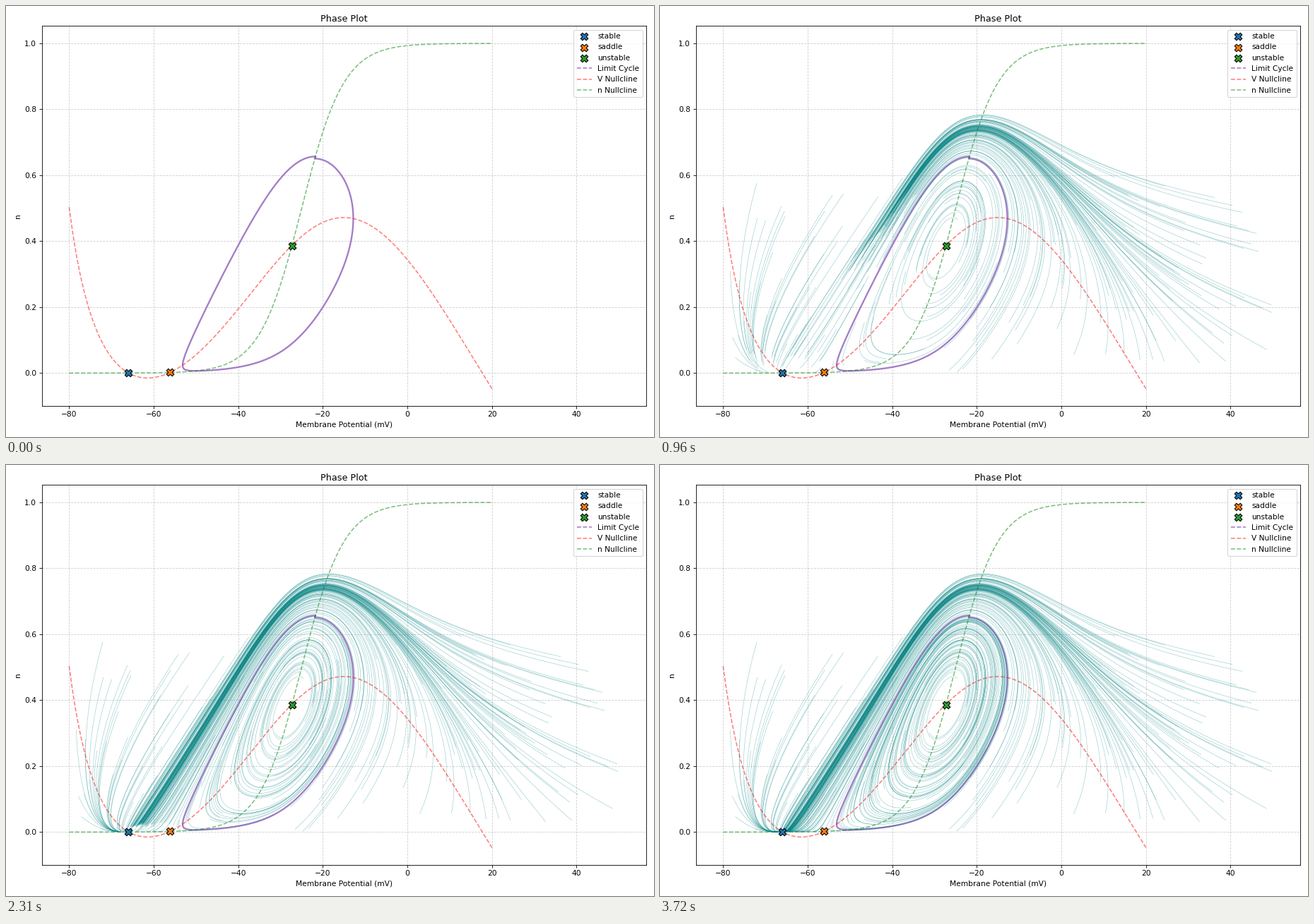
A matplotlib script for the animation above (3.75 s loop, 917x611 px).

```python
import numpy as np
import matplotlib.pyplot as plt
from matplotlib.animation import FuncAnimation
from matplotlib.collections import LineCollection
from matplotlib.lines import Line2D

WIDTH, HEIGHT, DPI = 917, 611, 76.4
FRAMES, INTERVAL = 125, 30
FRAME_TIME = 0.01    # model milliseconds per frame
SUBSTEPS = 2
STARTS = 180
PEAK = 0.657         # highest n on the limit cycle

G_LEAK, G_NA, G_K = 8, 20, 10
E_LEAK, E_NA, E_K = -80, 60, -90


def m_inf(v):
    return 1 / (1 + np.exp((-20 - v) / 15))


def n_inf(v):
    return 1 / (1 + np.exp((-25 - v) / 5))


def inward(v):
    return G_LEAK * (v - E_LEAK) + G_NA * m_inf(v) * (v - E_NA)


def v_nullcline(v):
    return -inward(v) / (G_K * (v - E_K))


def slope(state, tau):
    v, n = state
    dv = -inward(v) - G_K * n * (v - E_K)
    return np.array([dv, (n_inf(v) - n) / tau])


def rk4(state, h, tau):
    a = slope(state, tau)
    b = slope(state + h / 2 * a, tau)
    c = slope(state + h / 2 * b, tau)
    d = slope(state + h * c, tau)
    return state + h / 6 * (a + 2 * b + 2 * c + d)


def orbit(tau, h=0.002, limit=1.5):
    """One turn from the peak; the flag tells whether it came back."""
    state = np.array([-25 + 5 * np.log(PEAK / (1 - PEAK)), PEAK])
    points, rising = [state], False
    for _ in range(int(limit / h)):
        state = rk4(state, h, tau)
        points.append(state)
        climbs = n_inf(state[0]) > state[1]
        if rising and not climbs and state[1] > 0.3:
            return np.array(points), True
        rising = climbs
    return np.array(points), False


def tune_tau(low=0.12, high=0.16):
    """Find the time constant whose limit cycle peaks at PEAK."""
    for _ in range(18):
        mid = (low + high) / 2
        points, closed = orbit(mid)
        if closed and points[-1, 1] < PEAK:
            low = mid
        else:
            high = mid
    return low


def trajectories(tau):
    rng = np.random.default_rng(8)
    state = rng.uniform([-80, 0], [50, 0.6], (STARTS, 2)).T
    path = [state]
    for _ in range(FRAMES * SUBSTEPS):
        state = rk4(state, FRAME_TIME / SUBSTEPS, tau)
        path.append(state)
    return np.array(path).transpose(2, 0, 1)


tau = tune_tau()
cycle = orbit(tau)[0]
cycle = np.vstack([cycle, cycle[:1]])
paths = trajectories(tau)

plt.rcParams["font.family"] = "DejaVu Sans"
# The small excess keeps the pixel size from being rounded down.
fig = plt.figure(figsize=((WIDTH + 1e-6) / DPI, (HEIGHT + 1e-6) / DPI),
                 dpi=DPI)
ax = fig.add_axes([50.5 / WIDTH, 1 - 567 / HEIGHT,
                   855.5 / WIDTH, 538.5 / HEIGHT])
ax.set(xlim=(-86.5, 56.5), ylim=(-0.0997, 1.0524), title="Phase Plot",
       xlabel="Membrane Potential (mV)", ylabel="n")
ax.grid(linestyle="--", alpha=0.6)

markers = [ax.scatter(v, n_inf(v), s=100, marker="X", color=color,
                      edgecolors="black", linewidths=1, zorder=5, label=name)
           for v, color, name in [(-66, "tab:blue", "stable"),
                                  (-56.1, "tab:orange", "saddle"),
                                  (-27.3, "tab:green", "unstable")]]

purple = dict(color="tab:purple", alpha=0.85)
ax.plot(*cycle.T, lw=2.2, **purple)
v = np.linspace(-80, 20, 400)
v_line, = ax.plot(v, v_nullcline(v), "--", color="red", alpha=0.5,
                  label="V Nullcline")
n_line, = ax.plot(v, n_inf(v), "--", color="green", alpha=0.5,
                  label="n Nullcline")
cycle_key = Line2D([], [], ls="--", label="Limit Cycle", **purple)
ax.legend(handles=[*markers, cycle_key, v_line, n_line], loc="upper right")

flow = LineCollection([], colors="teal", linewidths=0.5, alpha=0.45, zorder=2)
ax.add_collection(flow, autolim=False)


def update(frame):
    shown = max(frame - 1, 0) * SUBSTEPS + 1
    flow.set_segments(paths[:, :shown] if shown > 1 else [])
    return flow,


anim = FuncAnimation(fig, update, frames=FRAMES, interval=INTERVAL,
                     init_func=lambda: update(0), repeat=True, repeat_delay=0)
plt.show()
```
